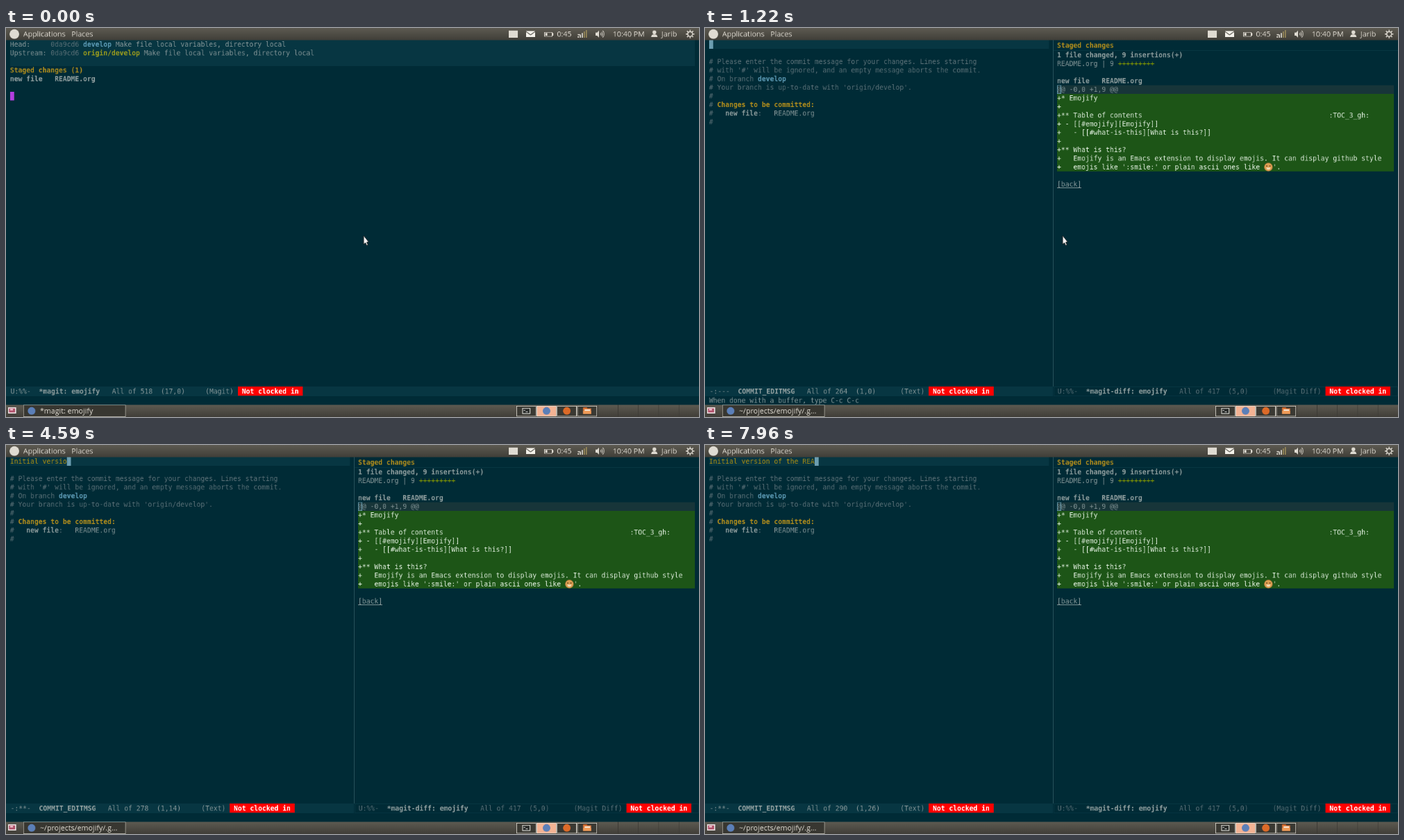
Write an HTML page with a canvas that moves like this. It is 998 by 561 pixels and loops after 8000 ms.

```html
<!DOCTYPE html>
<html lang="en">
<head>
<meta charset="utf-8">
<title>Writing a commit message</title>
<style>
  html, body { margin: 0; width: 100%; height: 100%; overflow: hidden; background: #002b36; }
  canvas { display: block; width: 998px; height: 561px; }
</style>
</head>
<body>
<canvas id="stage" width="998" height="561"></canvas>
<script>
const LOOP = 8000;
// The desktop is drawn at its own size, then shown smaller on the stage.
const W = 1366, H = 768;
const CELL = 8, LINE = 17, TOP = 24, MODE_Y = 708, ECHO_Y = 727, PANEL_Y = 744;
const SPLIT = 686, LEFT = 8, RIGHT = 694, EDGE = 1358;

const stage = document.getElementById('stage').getContext('2d');
stage.imageSmoothingQuality = 'high';
const desktop = document.createElement('canvas');
desktop.width = W;
desktop.height = H;
const ctx = desktop.getContext('2d', { alpha: true });

const BG = '#002b36', HILITE = '#073642', PURPLE = '#b23ee0', INSERT = '#6b9db0', LIGHT = '#dfdbd2';
const STYLES = {
  n: ['#839496', 400],   // normal
  d: ['#586e75', 400],   // dim
  b: ['#93a1a1', 700],   // bold
  h: ['#b38e1c', 700],   // heading
  m: ['#a58a14', 400],   // message summary
  l: ['#5f9db8', 700],   // local branch
  r: ['#a0a01c', 700],   // remote branch
  g: ['#859900', 400],   // diffstat
  a: ['#dfeedd', 400],   // added line
  w: ['#ffffff', 700]
};

// Time in ms and length of the summary line from then on.
const KEYS = [[0, 0], [1840, 1], [2040, 2], [2210, 3], [2900, 4], [3160, 5], [3280, 6], [3440, 7],
  [3580, 8], [3840, 9], [4020, 10], [4120, 11], [4300, 12], [4400, 13], [4590, 14], [4770, 15],
  [4880, 16], [5030, 17], [5120, 18], [5210, 19], [5350, 20], [5480, 21], [5580, 22], [5680, 23],
  [5970, 24], [6070, 25], [6810, 24], [7170, 23], [7540, 24], [7910, 25], [7960, 26]];
const ECHOES = [[0, ''], [970, 'Running git commit --'], [1140, ''], [1220, 'When done with a buffer, type C-c C-c'],
  [1840, ''], [2690, 'Starting "look" process...'], [2810, 'Starting "look" process...done'], [2900, '']];
const TITLES = [[0, '*magit: emojify'], [880, '*magit-commit-popup*'], [1060, '*magit: emojify'],
  [1220, '~/projects/emojify/.g...']];
const POINTERS = [[0, 'arrow'], [880, 'beam'], [1060, 'arrow'], [1840, '']];

const at = (table, t) => table.filter(([start]) => start <= t).pop()[1];

function rect(x, y, w, h, color) {
  ctx.fillStyle = color;
  ctx.fillRect(x, y, w, h);
}

function frame(x, y, w, h, color) {
  ctx.strokeStyle = color;
  ctx.lineWidth = 1;
  ctx.strokeRect(x + 0.5, y + 0.5, w - 1, h - 1);
}

function disc(x, y, r, color) {
  ctx.fillStyle = color;
  ctx.beginPath();
  ctx.arc(x, y, r, 0, 7);
  ctx.fill();
}

function shape(points, color, outline) {
  ctx.beginPath();
  points.forEach(([x, y]) => ctx.lineTo(x, y));
  ctx.closePath();
  ctx.fillStyle = color;
  ctx.fill();
  if (outline) {
    ctx.strokeStyle = outline;
    ctx.lineWidth = 1;
    ctx.stroke();
  }
}

function arc(x, y, r, from, to, color, width) {
  ctx.strokeStyle = color;
  ctx.lineWidth = width;
  ctx.beginPath();
  ctx.arc(x, y, r, from, to);
  ctx.stroke();
}

// Alternating style keys and strings on the character grid; y is the top of the line.
function put(x, y, ...spans) {
  for (let i = 0; i < spans.length; i += 2) {
    const [color, weight] = STYLES[spans[i]];
    ctx.font = `${weight} 13.29px "DejaVu Sans Mono", monospace`;
    ctx.fillStyle = color;
    ctx.fillText(spans[i + 1], x, y + 13);
    x += spans[i + 1].length * CELL;
  }
}

function label(text, x, y) {
  ctx.font = '14.6px "Open Sans", "Noto Sans", sans-serif';
  ctx.fillStyle = LIGHT;
  ctx.fillText(text, x, y);
}

function modeLine(x, y, w, active, flags, name, size, pos, mode) {
  const style = active ? 'n' : 'd';
  rect(x, y, w, 19, active ? HILITE : BG);
  if (!active) frame(x, y, w, 19, HILITE);
  const tail = `   All of ${size}  ${pos.padEnd(11)}${mode} `;
  const start = x + (x ? 8 : 9);
  put(start, y + 1, style, flags + '  ', 'b', name, style, tail);
  const badge = start + (flags.length + 2 + name.length + tail.length) * CELL;
  rect(badge, y, 16 * CELL, 18, '#ff0000');
  put(badge + CELL, y + 1, 'w', 'Not clocked in');
}

function status(active) {
  const row = i => TOP + LINE * i;
  rect(LEFT, TOP, EDGE - LEFT, 3 * LINE, HILITE);
  const subject = ' Make file local variables, directory local';
  put(LEFT, row(0), 'n', 'Head:     ', 'd', '0da9cd6 ', 'l', 'develop', 'n', subject);
  put(LEFT, row(1), 'n', 'Upstream: ', 'd', '0da9cd6 ', 'r', 'origin/develop', 'n', subject);
  put(LEFT, row(3), 'h', 'Staged changes (1)');
  put(LEFT, row(4), 'b', 'new file   README.org');
  if (active) rect(LEFT, row(6), CELL, LINE, PURPLE);
  else frame(LEFT, row(6), CELL, LINE, PURPLE);
  modeLine(0, active ? MODE_Y : 317, W, active, 'U:%%-', '*magit: emojify', 518, '(17,0)', '(Magit)');
}

function popup() {
  const row = i => 336 + LINE * i;
  const cell = (col, i, key, text, gap = key.length + 1) => {
    put(LEFT + col * CELL, row(i), 'b', key);
    put(LEFT + (col + gap) * CELL, row(i), 'n', text);
  };
  const flags = (first, list) => list.forEach(([key, text, arg], i) =>
    put(LEFT + CELL, row(first + i), 'b', key, 'n', ` ${text} (`, 'd', arg, 'n', ')'));

  rect(LEFT, row(14), EDGE - LEFT, LINE, HILITE);
  [['Switches', 0], ['Options', 8], ['Actions', 13], ['Common Commands', 18]]
    .forEach(([text, i]) => put(LEFT, row(i), 'n', text));
  flags(1, [
    ['-a', 'Stage all modified and deleted files', '--all'],
    ['-e', 'Allow empty commit', '--allow-empty'],
    ['-v', 'Show diff of changes to be committed', '--verbose'],
    ['-n', 'Bypass git hooks', '--no-verify'],
    ['-s', 'Add Signed-off-by line', '--signoff'],
    ['-R', 'Claim authorship and reset author date', '--reset-author']
  ]);
  flags(9, [
    ['=A', 'Override the author', '--author='],
    ['=S', 'Sign using gpg', '--gpg-sign='],
    ['=C', 'Reuse commit message', '--reuse-message=']
  ]);
  [['c Commit', 'e Extend', 'f Fixup', 'F Instant Fixup'],
   ['', 'w Reword', 's Squash', 'S Instant Squash'],
   ['', 'a Amend', 'A Augment']]
    .forEach((line, i) => line.forEach((text, j) =>
      cell(1 + 20 * j, 14 + i, text.slice(0, 1), text.slice(2))));
  cell(1, 19, 'C-c C-c', 'Set defaults');
  cell(1, 20, 'C-x C-s', 'Save defaults');
  cell(28, 19, 'C-h i', 'View popup manual');
  cell(28, 20, '?', 'Popup help prefix', 6);
  cell(55, 19, 'C-t', 'Toggle this section');
  cell(55, 20, 'C-g', 'Abort');
  rect(LEFT, row(14), CELL, LINE, PURPLE);
  modeLine(0, MODE_Y, W, true, 'U:%%-', '*magit-commit-popup*', 783, '(15,0)', '(MagitPopup)');
}

function message(t) {
  const row = i => TOP + LINE * i;
  const count = at(KEYS, t);
  const summary = 'Initial version of the ' + (t < 6810 ? 'Re' : 'REA');
  rect(LEFT, TOP, 678 - LEFT, LINE, HILITE);
  put(LEFT, row(0), 'm', summary.slice(0, count));
  rect(LEFT + count * CELL, TOP, CELL, LINE, INSERT);
  [['d', '# Please enter the commit message for your changes. Lines starting'],
   ['d', "# with '#' will be ignored, and an empty message aborts the commit."],
   ['d', '# On branch ', 'l', 'develop'],
   ['d', "# Your branch is up-to-date with 'origin/develop'."],
   ['d', '#'],
   ['d', '# ', 'h', 'Changes to be committed:'],
   ['d', '#   ', 'b', 'new file', 'd', ':   ', 'n', 'README.org'],
   ['d', '#']].forEach((line, i) => put(LEFT, row(i + 2), ...line));
  modeLine(0, MODE_Y, SPLIT, true, count ? '-:**-' : '-:---', 'COMMIT_EDITMSG',
    264 + count, `(1,${count})`, '(Text)');
}

function smiley(x, y) {
  disc(x, y, 8.5, '#a8763c');
  disc(x, y, 7.5, '#dda052');
  rect(x - 4.5, y - 3, 3, 2, '#6b4420');
  rect(x + 1.5, y - 3, 3, 2, '#6b4420');
  ctx.fillStyle = '#f0dcb8';
  ctx.beginPath();
  ctx.arc(x, y + 1, 4, 0, Math.PI);
  ctx.fill();
}

function diff() {
  const row = i => 45 + LINE * i;
  const width = EDGE - RIGHT;
  rect(SPLIT, TOP, 1, MODE_Y - TOP, '#2b535d');
  rect(SPLIT + 1, 44, W - SPLIT, 1, HILITE);
  put(RIGHT, 26, 'h', 'Staged changes');
  put(RIGHT, row(0), 'b', '1 file changed, 9 insertions(+)');
  put(RIGHT, row(1), 'n', 'README.org | 9 ', 'g', '+++++++++');
  put(RIGHT, row(3), 'b', 'new file   README.org');
  rect(RIGHT, row(4), width, LINE, '#173539');
  put(RIGHT, row(4), 'n', '@@ -0,0 +1,9 @@');
  frame(RIGHT, row(4), CELL, LINE, INSERT);
  rect(RIGHT, row(5), width, 9 * LINE, '#1d5517');
  ['+* Emojify', '+', '+** Table of contents'.padEnd(67) + ':TOC_3_gh:',
   '+ - [[#emojify][Emojify]]', '+   - [[#what-is-this][What is this?]]', '+', '+** What is this?',
   '+   Emojify is an Emacs extension to display emojis. It can display github style',
   "+   emojis like ':smile:' or plain ascii ones like "]
    .forEach((text, i) => put(RIGHT, row(5 + i), 'a', text));
  const face = RIGHT + 51 * CELL + 8.5;
  smiley(face, row(13) + 8.5);
  put(face + 8.5, row(13), 'a', "'.");
  put(RIGHT, row(15), 'n', '[back]');
  rect(RIGHT, row(15) + 15, 6 * CELL, 1, '#839496');
  modeLine(SPLIT + 1, MODE_Y, W - SPLIT - 1, false, 'U:%%-', '*magit-diff: emojify', 417, '(5,0)', '(Magit Diff)');
}

function panel(y) {
  const shade = ctx.createLinearGradient(0, y, 0, y + 24);
  shade.addColorStop(0, '#5d5a51');
  shade.addColorStop(1, '#403e38');
  rect(0, y, W, 24, shade);
}

function topPanel() {
  panel(0);
  disc(16.5, 12, 9.5, LIGHT);
  label('Applications', 34, 17);
  label('Places', 129, 17);
  rect(991, 5, 18, 14, LIGHT);
  // mail
  rect(1025, 6, 18, 12, '#f4f1ea');
  ctx.strokeStyle = '#4b4942';
  ctx.lineWidth = 1.5;
  ctx.beginPath();
  ctx.moveTo(1025, 7);
  ctx.lineTo(1034, 13.5);
  ctx.lineTo(1043, 7);
  ctx.stroke();
  // battery
  frame(1061, 8, 16, 9, LIGHT);
  rect(1077, 10, 2, 5, LIGHT);
  rect(1063, 10, 4, 5, LIGHT);
  label('0:45', 1086, 17);
  // signal
  for (let i = 0; i < 5; i++) rect(1127 + 4 * i, 16 - 3 * i, 2, 3 + 3 * i, i < 3 ? LIGHT : '#9c8c5a');
  shape([[1126, 12], [1132, 12], [1129, 15]], LIGHT);
  // volume
  shape([[1162, 9], [1165, 9], [1169, 5], [1169, 19], [1165, 15], [1162, 15]], LIGHT);
  [3, 6, 9].forEach(r => arc(1170, 12, r, -0.8, 0.8, LIGHT, 1.3));
  label('10:40 PM', 1196, 17);
  // user
  disc(1278, 8.5, 3.7, LIGHT);
  shape([[1271.5, 18], [1273, 14], [1276, 12.5], [1280, 12.5], [1283, 14], [1284.5, 18]], LIGHT);
  label('Jarib', 1292, 17);
  // gear
  arc(1348.5, 12, 4.7, 0, 7, LIGHT, 2);
  for (let i = 0; i < 8; i++) {
    const c = Math.cos(i * Math.PI / 4), s = Math.sin(i * Math.PI / 4);
    ctx.beginPath();
    ctx.moveTo(1348.5 + 5 * c, 12 + 5 * s);
    ctx.lineTo(1348.5 + 8.5 * c, 12 + 8.5 * s);
    ctx.stroke();
  }
}

function bottomPanel(title) {
  panel(PANEL_Y);
  rect(4, 749, 16, 12, '#e9dfe0');
  rect(6, 751, 12, 8, '#b0506a');
  rect(8, 752, 6, 3, '#efc6cf');
  rect(34, 744, 202, 24, '#383731');
  frame(34, 744, 202, 24, '#c4c1b7');
  disc(50.5, 756, 7.5, '#5b7fb8');
  label(title, 67, 761);

  const step = 40, first = 1006;
  for (let i = 0; i < 9; i++) {
    const x = first + step * i;
    if (i > 3) {
      rect(x, PANEL_Y, 1, 24, '#3b3934');
      continue;
    }
    rect(x, 746, step - 1, 21, i === 1 ? '#f3b394' : '#3a3933');
    frame(x, 746, step - 1, 21, '#e6e2d8');
  }
  const icon = i => first + step * (i + 0.5) - 0.5;
  rect(icon(0) - 8, 750, 16, 12, '#d6d6d0');
  rect(icon(0) - 6.5, 751.5, 13, 9, '#2a2d2b');
  rect(icon(0) - 5, 754, 3, 1.5, '#e8e8e8');
  rect(icon(0) - 1, 757, 4, 1.2, '#e8e8e8');
  disc(icon(1), 756, 7.5, '#5b7fb8');
  disc(icon(2), 756, 7.5, '#dc6a28');
  rect(icon(3) - 8, 749, 8, 4, '#c9652c');
  rect(icon(3) - 8, 751, 16, 11, '#e07b3c');
  rect(icon(3) - 5, 753, 11, 3, '#f3e3d2');
  rect(icon(3) - 8, 756, 16, 6, '#ef9a56');
}

function pointer(kind) {
  if (kind === 'arrow') {
    shape([[705, 410], [705, 427], [708.5, 424], [711, 429.5], [713.5, 428], [711, 423], [715, 422.5]],
      '#f4f4f4', '#1a1a1a');
  } else if (kind === 'beam') {
    rect(705, 407, 2, 12, '#f4f4f4');
    rect(703, 406, 6, 2, '#f4f4f4');
    rect(703, 418, 6, 2, '#f4f4f4');
  }
}

function draw(t) {
  rect(0, 0, W, H, BG);
  if (t < 1140) {
    const open = t >= 790 && t < 1060;
    status(!open);
    if (open) popup();
  } else {
    message(t);
    diff();
  }
  put(LEFT, ECHO_Y, 'n', at(ECHOES, t));
  topPanel();
  bottomPanel(at(TITLES, t));
  pointer(at(POINTERS, t));
  stage.drawImage(desktop, 0, 0, 998, 561);
}

const start = performance.now();
function tick() {
  draw((performance.now() - start) % LOOP);
  requestAnimationFrame(tick);
}
tick();
</script>
</body>
</html>
```
